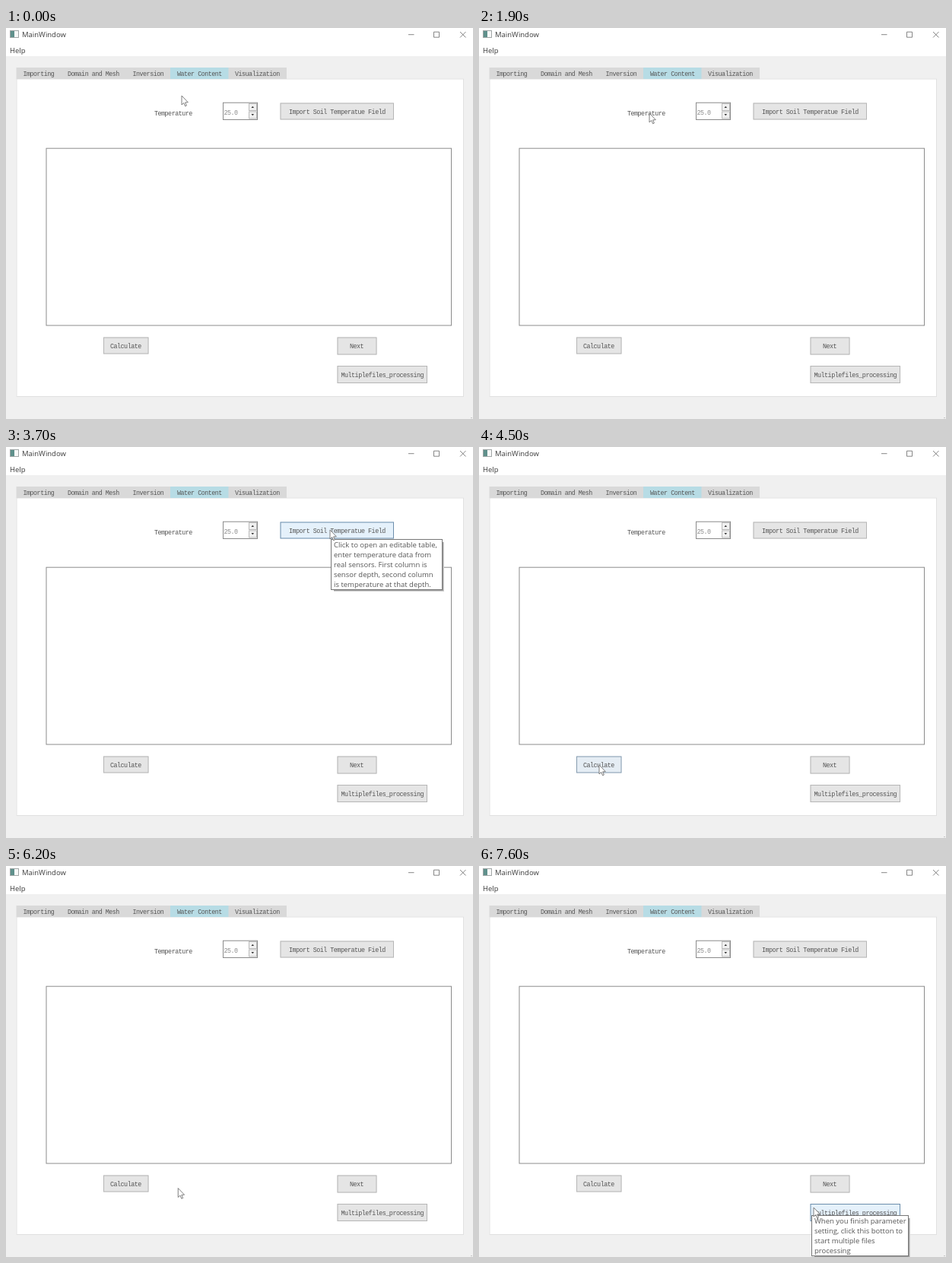
Write an HTML page with a canvas that moves like this. It is 614 by 514 pixels and loops after 7700 ms.

```html
<!DOCTYPE html>
<html lang="en">
<head>
<meta charset="utf-8">
<title>MainWindow</title>
<style>
  html, body { margin: 0; width: 100%; height: 100%; overflow: hidden; background: #f0f0f0; }
  canvas { display: block; }
</style>
</head>
<body>
<canvas id="stage" width="614" height="514"></canvas>
<script>
const ctx = document.getElementById('stage').getContext('2d');
const LOOP = 7700, STEP = 100;
const SANS = '9.5px "Open Sans", "Noto Sans", sans-serif';
const MONO = '8.4px "Liberation Mono", monospace';

// Pointer keys: time, x, y
const path = [
  [0, 231, 89], [200, 224, 111], [300, 224, 111], [400, 224, 112], [1900, 224, 112],
  [2200, 426, 109], [3900, 426, 109], [4300, 158, 418], [6100, 158, 418],
  [6500, 431, 440], [6600, 440, 449], [LOOP, 440, 449]
];

const tabs = [['Importing', 22.5], ['Domain and Mesh', 81], ['Inversion', 166.5],
  ['Water Content', 225], ['Visualization', 301]];

// Hover fades in after the first time and ends at the second
const buttons = [
  { label: 'Import Soil Temperatue Field', tx: 372, x: 360.5, y: 98.5, w: 149.5, h: 22, hover: [2100, 4000] },
  { label: 'Calculate', tx: 137, x: 128, y: 406.5, w: 59.5, h: 22, hover: [4300, 6200] },
  { label: 'Next', tx: 452, x: 435.5, y: 406.5, w: 52, h: 23 },
  { label: 'Multiplefiles_processing', tx: 440.5, x: 435.5, y: 444, w: 118.5, h: 23, hover: [6500, LOOP] }
];

const tips = [
  { from: 1100, to: 1900, x: 225, y: 124, w: 79, h: 39,
    lines: ['Set a constant', 'temperature for', 'whole field.'] },
  { from: 2400, to: 4000, x: 427, y: 121, w: 146, h: 66,
    lines: ['Click to open an editable table,', 'enter temperature data from',
      'real sensors. First column is', 'sensor depth, second column', 'is temperature at that depth.'] },
  { from: 5100, to: 6200, x: 159, y: 431, w: 121, h: 66,
    lines: ['After configuring the', 'temperature field, click to', 'start water content',
      'calculation based on', 'resistivity.'] },
  { from: 7000, to: LOOP, x: 437, y: 459, w: 127, h: 53,
    lines: ['When you finish parameter', 'setting, click this botton to', 'start multiple files', 'processing'] }
];

const clamp = v => Math.max(0, Math.min(1, v));
const mix = (a, b, k) => a + (b - a) * k;
const blend = (a, b, k) => `rgb(${a.map((v, i) => Math.round(mix(v, b[i], k)))})`;

function fill(color, x, y, w, h) {
  ctx.fillStyle = color;
  ctx.fillRect(x, y, w, h);
}

function box(x, y, w, h, color, border) {
  fill(color, x, y, w, h);
  ctx.strokeStyle = border;
  ctx.lineWidth = 1;
  ctx.strokeRect(x + 0.5, y + 0.5, w - 1, h - 1);
}

function text(str, x, y, font = MONO, color = '#555') {
  ctx.font = font;
  ctx.letterSpacing = font === MONO ? '-0.5px' : '0px';
  ctx.fillStyle = color;
  ctx.fillText(str, x, y);
}

function poly(points, color, stroke) {
  ctx.beginPath();
  points.forEach(([x, y]) => ctx.lineTo(x, y));
  ctx.closePath();
  ctx.fillStyle = color;
  ctx.fill();
  if (stroke) {
    ctx.strokeStyle = stroke;
    ctx.lineWidth = 0.9;
    ctx.stroke();
  }
}

function drawTitleBar() {
  fill('#fff', 0, 0, 614, 37);
  box(5, 3, 12, 10, '#f8f8f8', '#a0a6a6');
  fill('#5f908b', 6, 4, 5, 8);
  text('MainWindow', 21, 12.4, SANS, '#3c3c3c');
  text('Help', 5, 32.8, SANS, '#3c3c3c');
  ctx.strokeStyle = '#666';
  ctx.lineWidth = 0.8;
  ctx.beginPath();
  ctx.moveTo(529, 8.7); ctx.lineTo(536.5, 8.7);
  ctx.rect(562.5, 5.2, 7, 7);
  ctx.moveTo(597, 5); ctx.lineTo(604.5, 12.5);
  ctx.moveTo(604.5, 5); ctx.lineTo(597, 12.5);
  ctx.stroke();
}

function drawSpinBox() {
  text('Temperature', 195, 115);
  box(285, 97.7, 46, 23.3, '#fff', '#8a8a8a');
  text('25.0', 286.5, 113.5, MONO, '#888');
  box(319, 99, 11, 10, '#f0f0f0', '#bbb');
  box(319, 109.5, 11, 10, '#f0f0f0', '#bbb');
  poly([[322.5, 105], [324.3, 102.7], [326, 105]], '#333');
  poly([[322.5, 113], [324.3, 115.3], [326, 113]], '#333');
}

function drawButton({ label, tx, x, y, w, h, hover }, t) {
  const k = hover && t < hover[1] ? clamp((t - hover[0]) / 300) : 0;
  box(x, y, w, h, blend([229, 229, 229], [229, 241, 251], k), blend([182, 182, 182], [108, 142, 172], k));
  text(label, tx, y + h / 2 + 3.4);
}

function drawTip({ from, to, x, y, w, h, lines }, t) {
  if (t < from || t >= to) return;
  const r = x + w, b = y + h;
  fill('#a0a0a0', r, y + 4, 2, h - 2);
  fill('#a0a0a0', x + 4, b, w - 4, 2);
  fill('#cfcfcf', r + 2, y + 4, 1, h - 1);
  fill('#cfcfcf', x + 4, b + 2, w - 2, 1);
  if (t < from + STEP) return;   // the shadow shows one step before the body
  box(x, y, w + 1, h + 1, '#fff', '#777');
  lines.forEach((line, i) => text(line, x + 4, y + 11.3 + i * 12.8, SANS, '#575757'));
}

function drawPointer(t) {
  const i = path.findIndex(key => key[0] > t);
  const [t0, x0, y0] = path[i - 1], [t1, x1, y1] = path[i];
  const k = (t - t0) / (t1 - t0);
  const x = mix(x0, x1, k), y = mix(y0, y1, k);
  const arrow = [[0, 0], [0, 12], [2.7, 9.5], [4.6, 13.8], [6.4, 13], [4.6, 8.9], [8.3, 8.7]];
  poly(arrow.map(([dx, dy]) => [x + dx, y + dy]), '#fff', '#707070');
}

function draw(t) {
  fill('#f0f0f0', 0, 0, 614, 514);
  drawTitleBar();
  box(13.5, 66.5, 588.5, 418.5, '#fff', '#e0e0e0');
  fill('#d9d9d9', 13.5, 52, 355.5, 15);
  fill('#b7dce5', 216, 52, 76.5, 15);
  tabs.forEach(([label, x]) => text(label, x, 63.2));
  drawSpinBox();
  box(52.5, 157.7, 533.5, 233.8, '#fff', '#8c8c8c');
  buttons.forEach(button => drawButton(button, t));
  fill('#c4c4c4', 611, 512, 2, 1);
  tips.forEach(tip => drawTip(tip, t));
  drawPointer(t);
}

const start = performance.now();
function frame() {
  const t = (performance.now() - start) % LOOP;
  draw(Math.floor(t / STEP) * STEP);
  requestAnimationFrame(frame);
}
frame();
</script>
</body>
</html>
```
